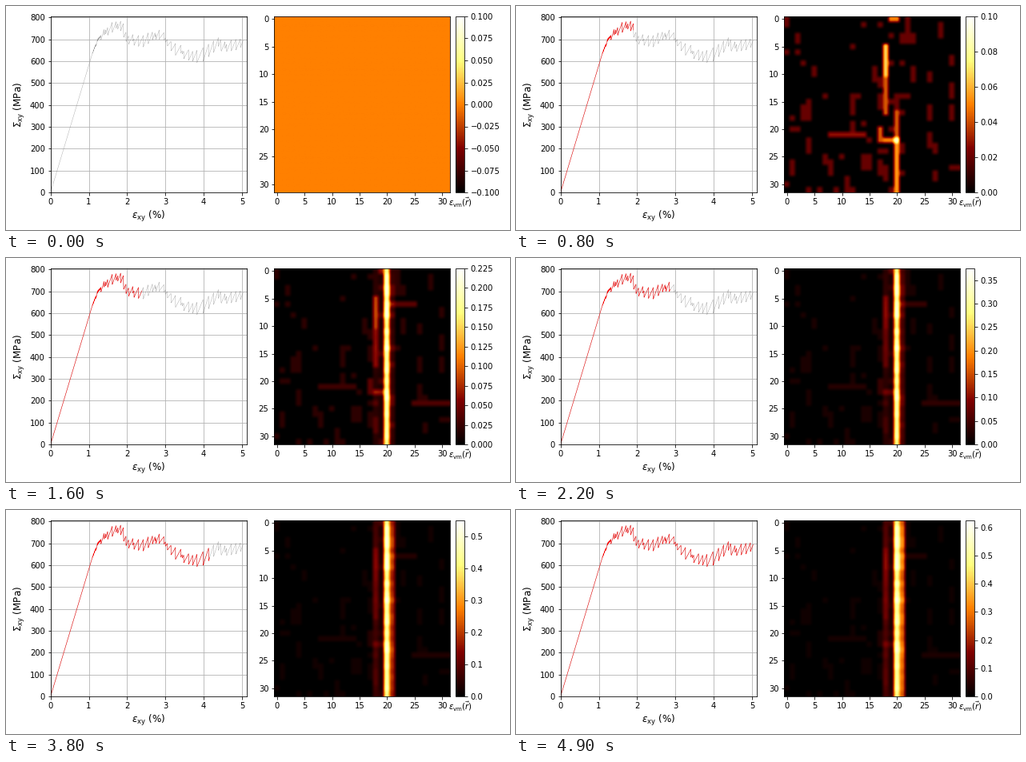
These frames come from a looping animation (630 by 280 pixels, 5 s). A matplotlib script:

```python
import numpy as np
import matplotlib.pyplot as plt
from matplotlib.animation import FuncAnimation

W, H, DPI = 630, 280, 72
FRAMES, INTERVAL = 50, 100
N = 32
plt.rcParams.update({"font.family": "DejaVu Sans", "font.size": 10})
rng = np.random.default_rng(7)

# Mean stress after yielding, around which the sawtooth runs
MEAN_STRAIN = [0, 1.1, 1.25, 1.5, 1.90, 1.91, 2.4, 2.85, 3.2, 3.65, 4.0, 4.44, 4.46, 5.03]
MEAN_STRESS = [0, 640, 703, 745, 772, 705, 690, 725, 662, 622, 630, 690, 665, 680]

# Slip lines: first frame, rows, columns, strain
SLIPS = [
    (1, slice(5, 11), slice(18, 19), .066),
    (2, slice(11, 18), slice(18, 19), .042),
    (3, slice(17, 23), slice(20, 21), .042),
    (3, slice(23, 32), slice(20, 21), .055),
    (3, slice(20, 23), slice(17, 18), .042),
    (4, slice(22, 23), slice(18, 21), .050),
    (4, slice(0, 1), slice(19, 21), .050),
    (2, slice(21, 22), slice(8, 15), .028),
    (10, slice(6, 7), slice(21, 26), .040),
    (10, slice(24, 25), slice(25, 32), .035),
]

SITES = 75
site_row, site_col = rng.integers(0, N, (2, SITES))
site_birth = rng.integers(1, 9, SITES)
site_length = rng.choice([1, 1, 2, 3], SITES)
site_upright = rng.random(SITES) < .7
row_shape = rng.uniform(.78, 1, N)


def stress_curve():
    edges = [1.1]
    while edges[-1] < 5.1:
        widest = min(.15, .02 + .3 * (edges[-1] - 1.1))
        edges.append(edges[-1] + rng.uniform(.015, widest + .005))
    edges = np.array(edges)
    strain = np.linspace(0, 5.03, 3500)
    tooth = np.clip(np.searchsorted(edges, strain), 1, len(edges) - 1)
    middle = (edges[tooth - 1] + edges[tooth]) / 2
    saw = np.where(strain > 1.1, 420 * (strain - middle), 0)
    return strain, np.interp(strain, MEAN_STRAIN, MEAN_STRESS) + saw


def reached_strain(n):
    return np.interp(n, [0, 1, 8, 12, 22, 49], [0, 1.16, 1.905, 2.07, 2.87, 5.04])


def peak_strain(n):
    return np.interp(n, [0, 1, 8, 12, 16, 22, 26, 31, 38, 49],
                     [0, .02, .095, .165, .22, .36, .46, .49, .54, .605])


def strain_map(n):
    field = np.zeros((N, N))
    if n == 0:
        return field
    for i in np.flatnonzero(site_birth <= n):
        r, c, length = site_row[i], site_col[i], site_length[i]
        if site_upright[i]:
            field[r:r + length, c] = .02
        else:
            field[r, c:c + length] = .02
    slip = np.zeros((N, N))
    for birth, rows, cols, value in SLIPS:
        slip[rows, cols] += value * np.clip((n - birth) / 4, 0, 1)
    field = np.maximum(field, slip)

    # The shear band takes over column 20 and later widens to its right
    age = max(0, (n - 8) / 41)
    band = peak_strain(n) * min(1, (n - 8) / 3) * row_shape
    field[:, 20] = np.maximum(field[:, 20], band)
    for col, rate, power in [(18, .11, 1), (19, .04, .6), (21, .33, 1.5)]:
        field[:, col] += rate * age ** power * row_shape
    return field


def color_limits(n):
    if n == 0:
        return -.1, .1
    return 0, .025 * np.ceil(peak_strain(n) / .025)


def add_axes(x0, x1, top=13, bottom=233):
    return fig.add_axes([x0 / W, 1 - bottom / H, (x1 - x0) / W, (bottom - top) / H])


fig = plt.figure(figsize=(W / DPI, H / DPI), dpi=DPI, facecolor="white")

ax = add_axes(55.7, 300.7)
strain, stress = stress_curve()
ax.plot(strain, stress, color="gray", lw=.3)
loaded, = ax.plot([], [], color="red", lw=.5)
ax.set(xlim=(0, 5.12), ylim=(0, 804.5))
ax.grid(True)
ax.set_xlabel(r"$\epsilon_\mathrm{xy}$ (%)", fontsize=12)
ax.set_ylabel(r"$\Sigma_\mathrm{xy}$ (MPa)", fontsize=12)

map_ax = add_axes(335.4, 555.4)
image = map_ax.imshow(strain_map(0), cmap="afmhot", interpolation="hanning",
                      vmin=-.1, vmax=.1, aspect="auto")
bar_ax = add_axes(562.4, 573.4)
fig.colorbar(image, cax=bar_ax)
fig.text(567.9 / W, 1 - 246 / H, r"$\epsilon_\mathrm{vm}(\vec{r})$",
         ha="center", va="center")


def update(n):
    shown = strain < reached_strain(n)
    loaded.set_data(strain[shown], stress[shown])
    image.set_data(strain_map(n))
    image.set_clim(*color_limits(n))
    return loaded, image


anim = FuncAnimation(fig, update, frames=FRAMES, interval=INTERVAL, repeat=True,
                     repeat_delay=0, blit=False)
plt.show()
```
